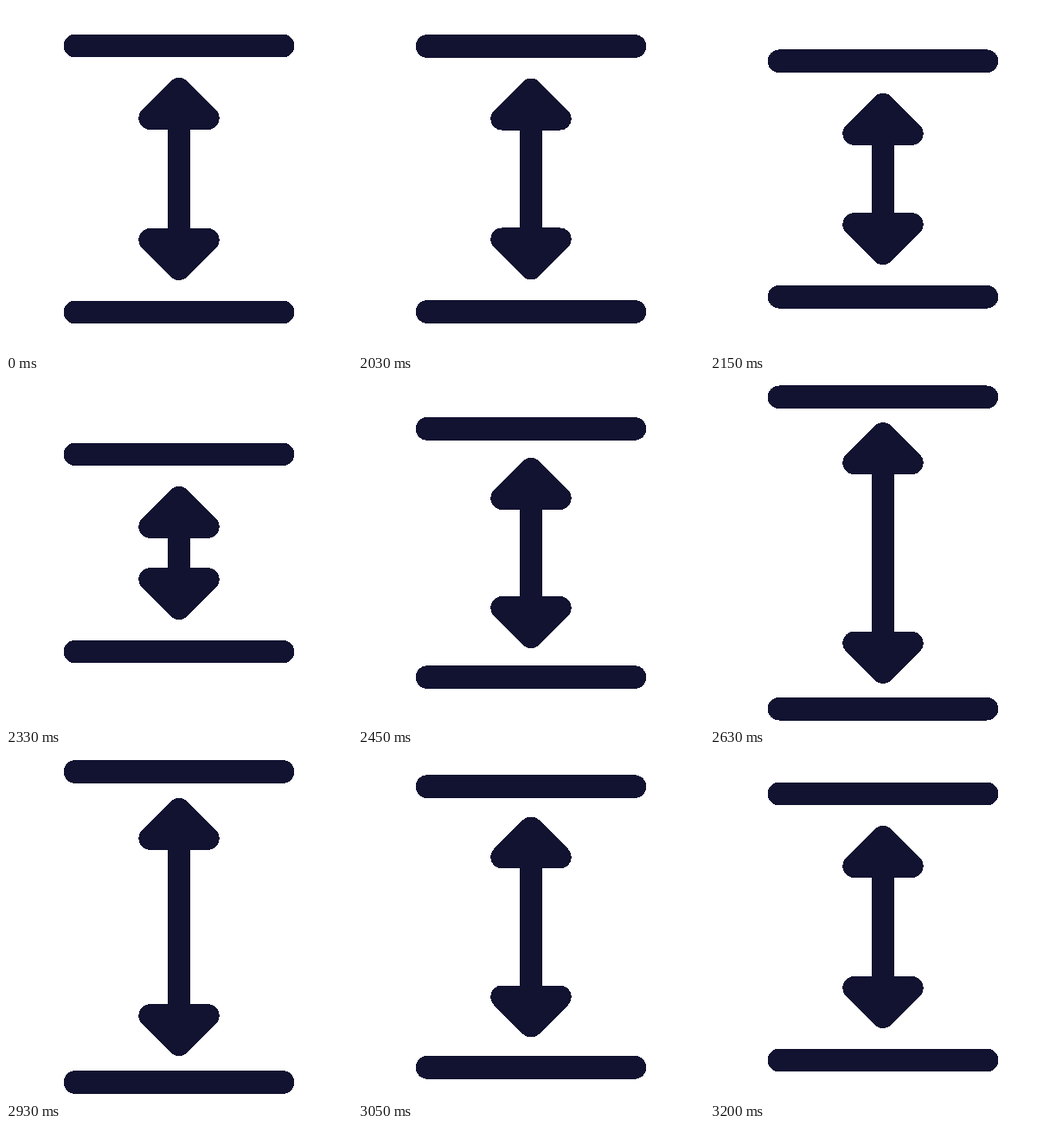
An HTML page for the animation above (3.23 s loop, 400 by 400 pixels).

```html
<!DOCTYPE html>
<html lang="en">
<head>
<meta charset="utf-8">
<title>Height arrow</title>
<style>
  html, body { margin: 0; width: 100%; height: 100%; overflow: hidden; background: #fff; }
  svg { display: block; width: 100%; height: 100%; }
</style>
</head>
<body>
<svg viewBox="0 0 400 400" shape-rendering="crispEdges" fill="#121331" stroke="#121331"
     stroke-width="26.67" stroke-linecap="round" stroke-linejoin="round">
  <defs>
    <path id="bar" d="M80 46H320"/>
    <path id="arrow" d="M200 96.33L233.33 129.67H166.67ZM200 129.67V200" stroke-linecap="butt"/>
  </defs>
  <g id="top"><use href="#bar"/><path id="head" d="M200 96.33L233.33 129.67H166.67Z"/></g>
  <g transform="matrix(1 0 0 -1 0 400)"><use href="#top"/></g>
  <path id="shaft" stroke-linecap="butt"/>
</svg>
<script>
const LOOP = 3230;
const bar = document.getElementById('bar');
const head = document.getElementById('head');
const shaft = document.getElementById('shaft');

// Inward shift of bar and arrowhead between key times
const segments = [
  { start: 2000, end: 2320, bar: [0, 40], head: [0, 40], ease: [0.5, 0.5] },
  { start: 2320, end: 2800, bar: [40, -31.7], head: [40, -40], ease: [0.333, 0.15] },
  { start: 2800, end: 3200, bar: [-31.7, 0], head: [-40, 0], ease: [0.5, 0.5] },
];

// Cubic bezier easing with handles (x1, 0) and (x2, 1)
function ease(u, [x1, x2]) {
  let low = 0, high = 1;
  for (let i = 0; i < 24; i++) {
    const s = (low + high) / 2, r = 1 - s;
    if (3 * x1 * s * r * r + 3 * x2 * s * s * r + s * s * s < u) low = s;
    else high = s;
  }
  return low * low * (3 - 2 * low);
}

const mix = ([a, b], k) => a + (b - a) * k;

function draw(now) {
  const t = now % LOOP;
  const seg = segments.find(s => t >= s.start && t < s.end);
  const k = seg ? ease((t - seg.start) / (seg.end - seg.start), seg.ease) : 0;
  const barShift = seg ? mix(seg.bar, k) : 0;
  const headShift = seg ? mix(seg.head, k) : 0;
  bar.setAttribute('transform', `translate(0 ${barShift})`);
  head.setAttribute('transform', `translate(0 ${headShift})`);
  shaft.setAttribute('d', `M200 ${130 + headShift}V${270 - headShift}`);
}

const origin = performance.now();
function tick() {
  draw(performance.now() - origin);
  requestAnimationFrame(tick);
}
tick();
</script>
</body>
</html>
```
